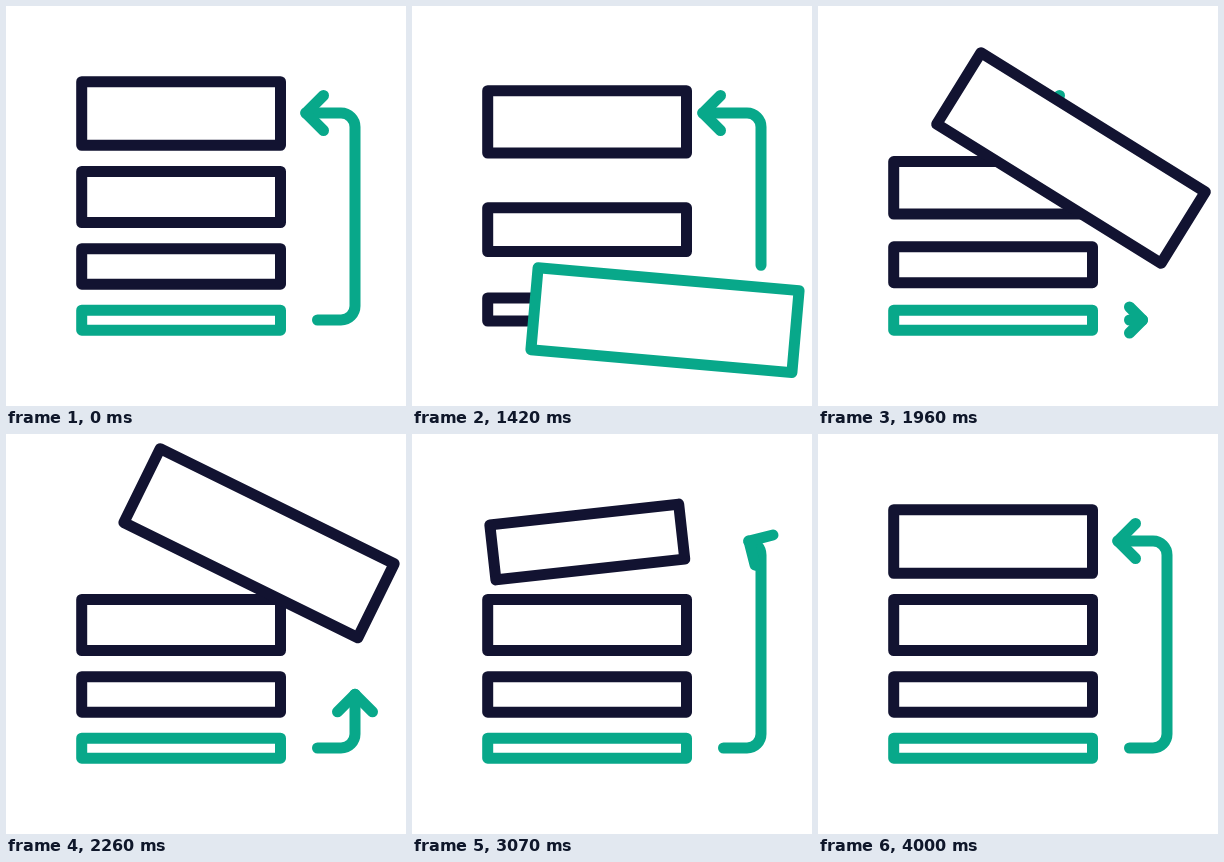
Animation, 400 px wide and 400 px high, one loop 4030 ms. Source, as an HTML page:

```html
<!DOCTYPE html>
<html lang="en">
<head>
<meta charset="utf-8">
<title>Move to top</title>
<style>
  html, body { margin: 0; width: 100%; height: 100%; overflow: hidden; background: #fff; }
  svg { display: block; width: 100vw; height: 100vh; }
</style>
</head>
<body>
<svg viewBox="0 0 400 400" fill="none" stroke-width="11" stroke-linecap="round" stroke-linejoin="round">
  <g id="arrows" stroke="#08a88a"></g>
  <g id="bars" fill="#fff"></g>
</svg>
<script>
const LOOP = 4030, START = 1030, STEP = 30;
const DARK = [18, 19, 49], GREEN = [8, 168, 138];
const LEFT = 75.7, WIDTH = 198.8;
// resting places from top to bottom: y, height
const SLOTS = [[75.7, 63.6], [165.5, 51], [242.7, 35.5], [304.2, 20]];
const HEAD = 17.5, OVERRUN = 150;
const ROUTE = 'M311.5 314H335A14 14 0 0 0 349 300V121A14 14 0 0 0 335 107H150';

function add(parent, tag, attrs = {}) {
  const el = document.createElementNS('http://www.w3.org/2000/svg', tag);
  set(el, attrs);
  return document.getElementById(parent).appendChild(el);
}

function set(el, attrs) {
  for (const name in attrs) el.setAttribute(name, attrs[name]);
}

// Smooth curve through [time, value] keys that never overshoots a key
function track(...keys) {
  const slope = i => (keys[i + 1][1] - keys[i][1]) / (keys[i + 1][0] - keys[i][0]);
  const last = keys.length - 1;
  const tangents = keys.map((_, i) => {
    if (i === 0 || i === last) return 0;
    const a = slope(i - 1), b = slope(i);
    return a * b <= 0 ? 0 : 2 * a * b / (a + b);
  });
  return t => {
    if (t <= keys[0][0]) return keys[0][1];
    if (t >= keys[last][0]) return keys[last][1];
    const i = keys.findIndex(k => k[0] > t) - 1;
    const [t0, v0] = keys[i], [t1, v1] = keys[i + 1];
    const d = t1 - t0, u = (t - t0) / d, s = u * u * (3 - 2 * u);
    return v0 + (v1 - v0) * s
      + d * u * (1 - u) * ((1 - u) * tangents[i] - u * tangents[i + 1]);
  };
}

const mix = (a, b, p) => a + (b - a) * p;
const blend = (a, b, p) => `rgb(${a.map((v, i) => Math.round(mix(v, b[i], p)))})`;

const shifts = [
  track([1150, 0], [1420, .1], [1960, .89], [2200, 1]),
  track([1060, 0], [1420, .47], [1960, .975], [2080, 1]),
  track([1000, 0], [1420, .8], [1750, 1])
];
const recolor = track([1600, 0], [1780, 1]);

const mover = {
  x: track([1000, 175.1], [1030, 176], [1220, 215], [1420, 253], [2280, 253], [2650, 225], [3070, 175.3], [3200, 175.1]),
  y: track([1500, 314.2], [1960, 152], [2080, 123], [2200, 112], [2400, 105], [2650, 102.7], [3070, 108], [3200, 107.5]),
  w: track([1000, 198.8], [1030, 199.5], [1220, 232], [1420, 262], [1960, 264], [2300, 260], [2650, 234], [3070, 190], [3190, 196], [3400, 198.8]),
  h: track([1000, 20], [1030, 20.3], [1220, 50], [1420, 82.3], [1960, 84], [2300, 82], [2650, 70], [3070, 55.3], [3190, 60], [3400, 63], [3700, 63.6]),
  turn: track([1000, 0], [1030, -1.15], [1200, -6.5], [1420, 5], [1540, 15], [1960, 31.8], [2000, 32], [2300, 25], [2650, 12.1], [3070, -6.3], [3190, -4.7], [3400, -1.2], [3700, 0])
};

const bars = [0, 1, 2].map(() => add('bars', 'rect', { x: LEFT, width: WIDTH }));
const box = add('bars', 'rect');

function makeArrow() {
  return { line: add('arrows', 'path', { d: ROUTE }), head: add('arrows', 'path') };
}
const leaving = makeArrow(), arriving = makeArrow();
const END = leaving.line.getTotalLength() - OVERRUN;

const leavingTail = track([1000, 0], [1030, .8], [1420, 86], [1700, 205], [1960, 340], [2080, 380]);
const leavingTip = track([1030, END], [1420, END + 9], [1960, END + 76], [2080, END + 100]);
const arrivingTip = track([1900, 0], [1960, 13], [2300, 95], [2650, 182], [3070, END - 37], [3300, END - 12], [3600, END - 1], [3800, END]);

function drawArrow({ line, head }, tail, tip, visible) {
  const display = visible ? 'inline' : 'none';
  const from = Math.min(tail, tip - .1);
  set(line, { display, 'stroke-dasharray': `${tip - from} 2000`, 'stroke-dashoffset': -from });
  const p = line.getPointAtLength(tip);
  const q = line.getPointAtLength(Math.max(0, tip - 11));
  const angle = Math.atan2(p.y - q.y, p.x - q.x) * 180 / Math.PI;
  const size = Math.min(HEAD, tip);
  set(head, {
    display,
    d: `M${-size} ${-size}L0 0L${-size} ${size}`,
    transform: `translate(${p.x} ${p.y}) rotate(${angle})`
  });
}

function draw(t) {
  bars.forEach((bar, i) => {
    const p = shifts[i](t), [y0, h0] = SLOTS[i], [y1, h1] = SLOTS[i + 1];
    set(bar, {
      y: mix(y0, y1, p),
      height: mix(h0, h1, p),
      stroke: i === 2 ? blend(DARK, GREEN, recolor(t)) : blend(DARK, DARK, 0)
    });
  });

  const w = mover.w(t), h = mover.h(t);
  set(box, {
    x: -w / 2, y: -h / 2, width: w, height: h,
    stroke: blend(GREEN, DARK, recolor(t)),
    transform: `translate(${mover.x(t)} ${mover.y(t)}) rotate(${mover.turn(t)})`
  });

  drawArrow(leaving, leavingTail(t), leavingTip(t), t < 2080);
  drawArrow(arriving, 0, arrivingTip(t), t > 1900);
}

let origin;
function tick(now) {
  origin ??= now;
  const t = Math.max(0, now - origin) % LOOP;
  // the resting pose is the same as the end of the move
  draw(t < START ? LOOP : START + Math.floor((t - START) / STEP) * STEP);
  requestAnimationFrame(tick);
}
draw(LOOP);
requestAnimationFrame(tick);
</script>
</body>
</html>
```
